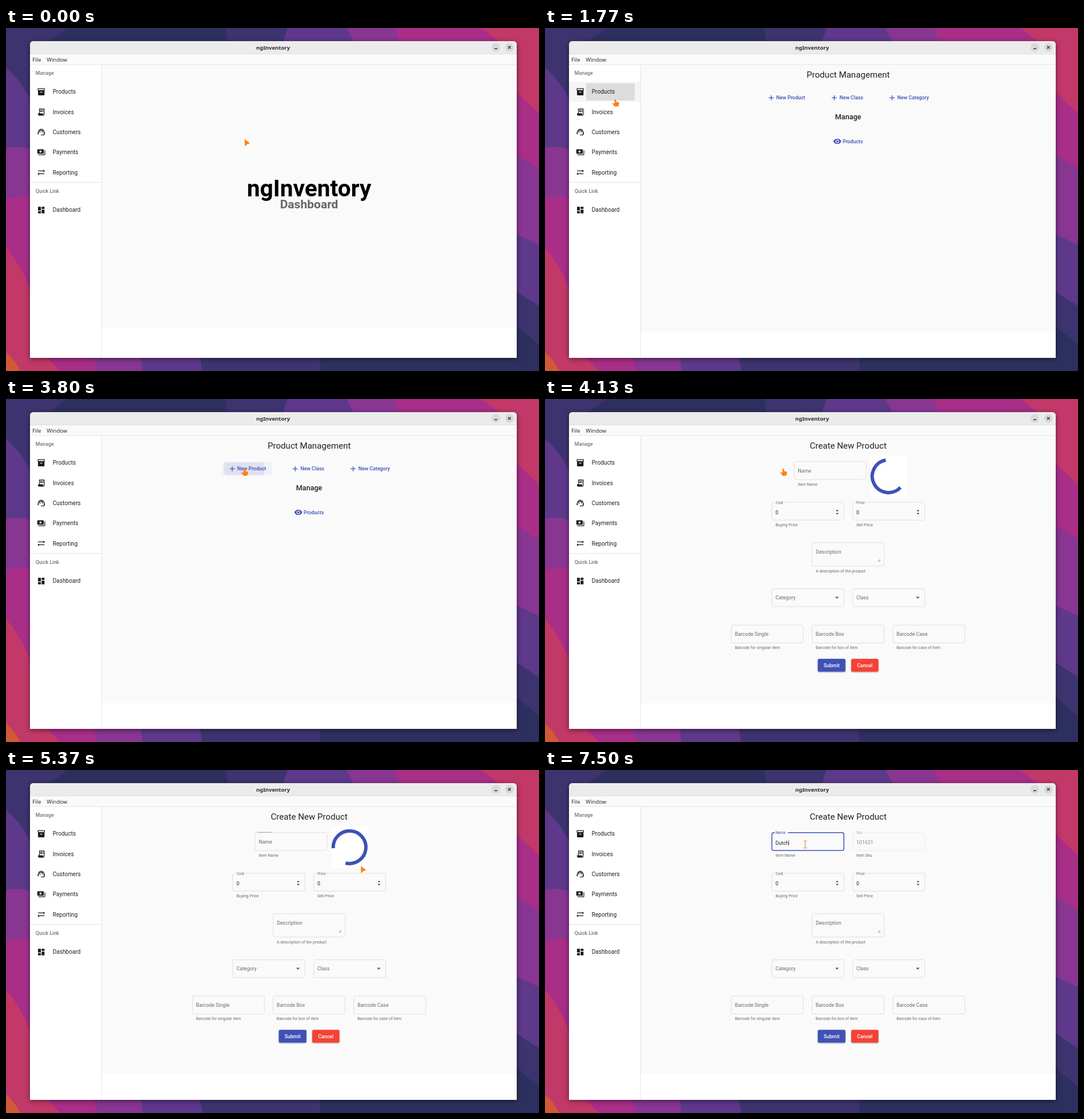
An HTML page for the animation above (8 s loop, 933 by 601 pixels).

```html
<!DOCTYPE html>
<html lang="en">
<head>
<meta charset="utf-8">
<title>Inventory walkthrough</title>
<style>
html, body { margin: 0; width: 100%; height: 100%; overflow: hidden; background: #2d305e; }
svg { display: block; width: 100vw; height: 100vh; }
text { font-family: Roboto, Arial, sans-serif; white-space: pre; }
.gtk { font-family: "Noto Sans", sans-serif; font-size: 9.5px; fill: #2e2e2e; }
.nav { font-size: 10.1px; fill: #212121; }
.head { font-size: 8.8px; font-weight: 500; fill: #757575; }
.title { font-size: 15.1px; fill: #212121; text-anchor: middle; }
.btn { font-size: 8.82px; font-weight: 500; fill: #3f51b5; }
.label { font-size: 8.82px; fill: #696969; }
.small { font-size: 6.6px; fill: #696969; }
.hint { font-size: 7.05px; fill: #696969; }
.value { font-size: 8.82px; fill: #212121; }
.off { opacity: .5; }
.mid { text-anchor: middle; }
.line { fill: none; stroke: #dcdcdc; stroke-width: .9; }
</style>
</head>
<body>
<svg id="stage" viewBox="0 0 933 601" preserveAspectRatio="none" xmlns="http://www.w3.org/2000/svg"></svg>
<script>
const LOOP = 8000;
const BLUE = '#3f51b5', ORANGE = '#ff7f0e';

const ICONS = {
  products: 'M20 2H4c-1 0-2 .9-2 2v3.01c0 .72.43 1.34 1 1.69V20c0 1.1 1.1 2 2 2h14c.9 0 2-.9 2-2V8.7c.57-.35 1-.97 1-1.69V4c0-1.1-1-2-2-2zm-5 12H9v-2h6v2zm5-7H4V4l16-.02V7z',
  invoices: 'M19.5 3.5L18 2l-1.5 1.5L15 2l-1.5 1.5L12 2l-1.5 1.5L9 2 7.5 3.5 6 2v14H3v3c0 1.66 1.34 3 3 3h12c1.66 0 3-1.34 3-3V2l-1.5 1.5zM19 19c0 .55-.45 1-1 1s-1-.45-1-1v-3H8V5h11v14zM9 7h6v2H9zM16 7h2v2h-2zM9 10h6v2H9zM16 10h2v2h-2z',
  customers: 'M21 12.22C21 6.73 16.74 3 12 3c-4.69 0-9 3.65-9 9.28-.6.34-1 .98-1 1.72v2c0 1.1.9 2 2 2h1v-6.1c0-3.87 3.13-7 7-7s7 3.13 7 7V19h-8v2h8c1.1 0 2-.9 2-2v-1.22c.59-.31 1-.92 1-1.64v-2.3c0-.7-.41-1.31-1-1.62zM8 12h2v2H8zM14 12h2v2h-2zM18 11.03C17.52 8.18 15.04 6 12.05 6c-3.03 0-6.29 2.51-6.03 6.45 2.47-1.01 4.33-3.21 4.86-5.89 1.31 2.63 4 4.44 7.12 4.47z',
  payments: 'M19 14V6c0-1.1-.9-2-2-2H3c-1.1 0-2 .9-2 2v8c0 1.1.9 2 2 2h14c1.1 0 2-.9 2-2zm-9-1c-1.66 0-3-1.34-3-3s1.34-3 3-3 3 1.34 3 3-1.34 3-3 3zm13-6v11c0 1.1-.9 2-2 2H4v-2h17V7h2z',
  reporting: 'M22 8l-4-4v3H3v2h15v3l4-4zM2 16l4 4v-3h15v-2H6v-3l-4 4z',
  dashboard: 'M3 13h8V3H3v10zm0 8h8v-6H3v6zm10 0h8V11h-8v10zm0-18v6h8V3h-8z',
  eye: 'M12 4.5C7 4.5 2.73 7.61 1 12c1.73 4.39 6 7.5 11 7.5s9.27-3.11 11-7.5c-1.73-4.39-6-7.5-11-7.5zM12 17c-2.76 0-5-2.24-5-5s2.24-5 5-5 5 2.24 5 5-2.24 5-5 5zm0-8c-1.66 0-3 1.34-3 3s1.34 3 3 3 3-1.34 3-3-1.34-3-3-3z',
  add: 'M19 13h-6v6h-2v-6H5v-2h6V5h2v6h6v2z'
};

// Markup helpers
const text = (x, y, cls, s, extra = '') => `<text x="${x}" y="${y}" class="${cls}" ${extra}>${s}</text>`;
const rect = (x, y, w, h, fill, extra = '') => `<rect x="${x}" y="${y}" width="${w}" height="${h}" fill="${fill}" ${extra}/>`;
const path = (d, extra = '') => `<path d="${d}" ${extra}/>`;
const group = (id, body) => `<g id="${id}">${body}</g>`;
const icon = (name, cx, cy, fill = '#1c1c1c') =>
  `<path d="${ICONS[name]}" fill="${fill}" fill-rule="evenodd" transform="translate(${cx - 7.56} ${cy - 7.56}) scale(.63)"/>`;

// Rounded outline whose top edge is open from x+5 for `gap` pixels
function outline(x, y, w, h, gap = 0, extra = 'class="line"') {
  const r = 3, a = x + 5;
  return path(`M${a + gap} ${y}H${x + w - r}q${r} 0 ${r} ${r}v${h - 2 * r}q0 ${r} ${-r} ${r}H${x + r}q${-r} 0 ${-r} ${-r}V${y + r}q0 ${-r} ${r} ${-r}H${a}`, extra);
}

function field(x, y, label, { hint = '', value = '', gap = 0, h = 31.3, cls = '' } = {}) {
  const labelText = value ? text(x + 6.2, y + 2.6, 'small', label) + text(x + 6.2, y + 20.7, 'value', value)
                          : text(x + 6.2, y + 18.8, 'label', label);
  return `<g class="${cls}">${outline(x, y, 126, h, gap)}${labelText}</g>` + text(x + 6.2, y + h + 10.9, 'hint', hint);
}

const stepper = x => path(`M${x - 2.4} 196.6l2.4 -2.5 2.4 2.5zM${x - 2.4} 199.8l2.4 2.5 2.4 -2.5z`, 'fill="#333"');
const dropdown = x => path(`M${x - 3.4} 346.4h6.8l-3.4 3.5z`, 'fill="#666"');
const raised = (x, w, fill, label) =>
  rect(x, 455.2, w, 22.6, fill, 'rx="2.5" filter="url(#lift)"') + text(x + w / 2, 469.6, 'btn mid', label, 'style="fill:#fff"');

function wallpaper() {
  const corner = ([c, x0, x1, y0, y1]) => path(`M${x0} 0L${x1} 23L894 ${y0}L933 ${y1}V0Z`, `fill="${c}"`);
  const lower = ([c, y0, y1, x0, x1]) => path(`M0 ${y0}Q26 ${(y0 + y1) / 2 - 6} 42 ${y1}L${x0} 578L${x1} 601H0Z`, `fill="${c}"`);
  const dark = '#3d346f', purple = '#5e388b', violet = '#883692', magenta = '#a92e88', crimson = '#c23869';
  return rect(0, 0, 933, 601, '#2d305e') +
    [[dark, 384, 388, 522, 555], [purple, 493, 485, 462, 487], [violet, 596, 608, 362, 380],
     [magenta, 680, 690, 222, 246], [crimson, 832, 862, 113, 150]].map(corner).join('') +
    path('M0 0H107Q92 12 75 23L550 578V601H0Z', `fill="${dark}"`) +
    [[purple, 70, 125, 340, 343], [violet, 210, 213, 236, 239],
     [magenta, 300, 297, 152, 162], [crimson, 385, 457, 72, 95]].map(lower).join('') +
    path('M0 568Q16 582 25 601H0Z', 'fill="#cf5a35"');
}

function frame() {
  return path('M42 578V30q0 -7 7 -7H887q7 0 7 7V578Z', 'fill="#fff" filter="url(#shadow)"') +
    path('M42 46V30q0 -7 7 -7H887q7 0 7 7V46Z', 'fill="#ebebeb"') +
    rect(42, 45.5, 852, 18.5, '#fafafa') + rect(42, 45.2, 852, .7, '#d9d9d9') +
    text(467.5, 37.8, 'gtk mid', 'ngInventory', 'font-weight="700"') +
    text(46.3, 58.7, 'gtk', 'File') + text(71.3, 58.7, 'gtk', 'Window') +
    '<circle cx="857.5" cy="34" r="7.6" fill="#d9d9d9"/><circle cx="881.3" cy="34" r="7.6" fill="#d9d9d9"/>' +
    path('M855 36.3h5M879 31.7l4.6 4.6M883.6 31.7l-4.6 4.6', 'stroke="#2e2e2e" stroke-width="1.4"') +
    rect(167, 64, 727, 469, '#fafafa', 'id="panel"') +
    rect(42, 63.7, 852, .8, '#dedede') + rect(166.7, 64, .8, 514, '#dedede');
}

function sidebar() {
  const items = ['Products', 'Invoices', 'Customers', 'Payments', 'Reporting'];
  return rect(42.3, 94, 124.4, 35.3, '#000', 'id="row"') + rect(72, 97, 85, 30, '#000', 'id="focus"') +
    '<circle id="rowRipple" cx="123" cy="125" clip-path="url(#rowClip)"/>' +
    text(51.8, 82.4, 'head', 'Manage') +
    items.map((s, i) => icon(s.toLowerCase(), 61.7, 111.8 + 35.28 * i) + text(81.7, 115.4 + 35.28 * i, 'nav', s)).join('') +
    rect(42, 270.2, 125, .8, '#dedede') +
    text(51.8, 289.4, 'head', 'Quick Link') +
    icon('dashboard', 61.7, 319) + text(81.7, 322.4, 'nav', 'Dashboard');
}

const home = () =>
  text(530.6, 295.2, 'mid', 'ngInventory', 'font-size="40.7" font-weight="700"') +
  text(530.6, 316.2, 'mid', 'Dashboard', 'font-size="21" font-weight="700" fill="#666"');

const manage = () =>
  rect(378, 110.8, 88, 22.8, BLUE, 'id="hover" rx="2.5"') +
  `<circle id="btnRipple" cx="417" cy="122" fill="${BLUE}" clip-path="url(#btnClip)"/>` +
  text(530.7, 87.2, 'title', 'Product Management') +
  [[396, 404.8, 'New Product'], [506.3, 515.4, 'New Class'], [607.6, 616.7, 'New Category']]
    .map(([cx, x, s]) => icon('add', cx, 122.4, BLUE) + text(x, 125.4, 'btn', s)).join('') +
  text(530.6, 160.1, 'mid', 'Manage', 'font-size="12.6" font-weight="500" fill="#212121"') +
  icon('eye', 511.7, 198.6, BLUE) + text(521, 201.6, 'btn', 'Products');

const form = () =>
  text(530.7, 87.2, 'title', 'Create New Product') +
  group('name',
    outline(0, 109.7, 126, 31.3, 0, 'id="nameLine" class="line"') +
    outline(0, 109.7, 126, 31.3, 0, 'id="nameHover" fill="none" stroke="#333" stroke-width="1"') +
    path('M4 109.2h25', 'id="nameNotch" stroke="#999" stroke-width=".9"') +
    outline(0, 109.7, 126, 31.3, 23, `id="nameFocus" fill="none" stroke="${BLUE}" stroke-width="1.5"`) +
    text(6.2, 128.5, '', 'Name', 'id="nameLabel"') + text(6.2, 130.5, 'value', '', 'id="typed"') +
    rect(0, 122.2, .7, 10, '#333', 'id="caret"') + text(6.2, 151.9, 'hint', 'Item Name')) +
  group('spinner', rect(570, 99, 63, 72, '#fff') + path('', `id="arc" fill="none" stroke="${BLUE}" stroke-width="6"`)) +
  group('sku', field(538.7, 109.7, 'Sku', { hint: 'Item Sku', value: '101631', gap: 14, cls: 'off' })) +
  field(397.2, 180.9, 'Cost', { hint: 'Buying Price', value: '0', gap: 16 }) + stepper(511.5) +
  field(538.7, 180.9, 'Price', { hint: 'Sell Price', value: '0', gap: 17 }) + stepper(653) +
  field(467.7, 251.7, 'Description', { hint: 'A description of the product', h: 41 }) +
  path('M582.5 285l4.5 -4.5M585 285l2 -2', 'stroke="#555" stroke-width=".7"') +
  field(397.2, 332.5, 'Category') + dropdown(511) +
  field(538.7, 332.5, 'Class') + dropdown(652.5) +
  ['Single', 'Box', 'Case'].map((s, i) => field(326.2 + 141.4 * i, 396.2, 'Barcode ' + s,
    { hint: `Barcode for ${['singular', 'box of', 'case of'][i]} item` })).join('') +
  raised(477.5, 48.4, BLUE, 'Submit') + raised(536, 47.7, '#f44336', 'Cancel');

// Pointer shapes, drawn around their hot spot
const pointers = () => group('cursor',
  path('M0 0L9.6 7.8L4.4 9L.6 13.2Z', `id="arrow" fill="${ORANGE}"`) +
  path('M-1.4 .6q1.4 -1.2 2.4 0L1.6 4.3L5.4 5.2q1.6 .4 1.4 2L6 10.6Q5.6 12.4 4 12.4H.2Q-1.2 12.4 -2 11.2L-4.8 7.4q-.2 -1.4 1.2 -1.2L-1 7.4Z', `id="hand" fill="${ORANGE}"`) +
  path('M-3 -6.2H-.8Q0 -6.2 0 -5.2Q0 -6.2 .8 -6.2H3M0 -5.2V5.4M-3 6.2H-.8Q0 6.2 0 5.2Q0 6.2 .8 6.2H3', 'id="beam" fill="none" stroke="#e2a050" stroke-width="1.3"'));

document.getElementById('stage').innerHTML =
  `<defs>
    <filter id="shadow" x="-10%" y="-10%" width="120%" height="120%"><feDropShadow dx="0" dy="2" stdDeviation="5" flood-opacity=".5"/></filter>
    <filter id="lift" x="-20%" y="-20%" width="140%" height="160%"><feDropShadow dx="0" dy="1.1" stdDeviation=".9" flood-opacity=".35"/></filter>
    <clipPath id="rowClip"><rect x="72" y="97" width="85" height="30"/></clipPath>
    <clipPath id="btnClip"><rect x="378" y="110.8" width="88" height="22.8" rx="2.5"/></clipPath>
  </defs>` + wallpaper() + frame() + sidebar() +
  group('home', home()) + group('manage', manage()) + group('form', form()) + pointers();

// Timing
const el = {};
document.querySelectorAll('[id]').forEach(n => el[n.id] = n);
const set = (id, attrs) => { for (const k in attrs) el[id].setAttribute(k, attrs[k]); };
const show = (id, on) => set(id, { display: on ? 'inline' : 'none' });
const ramp = (t, a, b) => Math.min(1, Math.max(0, (t - a) / (b - a)));
const mix = (a, b, p) => a + (b - a) * p;
const smooth = p => p * p * (3 - 2 * p);

function bezier(x1, y1, x2, y2) {
  const at = (a, b, s) => 3 * (1 - s) ** 2 * s * a + 3 * (1 - s) * s * s * b + s ** 3;
  return x => {
    let lo = 0, hi = 1;
    for (let i = 0; i < 24; i++) {
      const m = (lo + hi) / 2;
      if (at(x1, x2, m) < x) lo = m; else hi = m;
    }
    return at(y1, y2, lo);
  };
}
const dashEase = bezier(.35, 0, .25, 1), floatEase = bezier(.25, .8, .25, 1);

const OPEN_MANAGE = 1600, OPEN_FORM = 3890, LOADED = 5430, FOCUS = 6200;
const MOVES = [
  [370, 417.7, 194.5], [830, 190.6, 142], [1000, 190.6, 142], [1100, 123, 125],
  [1850, 123, 125], [2230, 394, 133], [2300, 394, 133], [2630, 417, 122],
  [4430, 417, 122], [5330, 621, 168], [5670, 621, 168], [6200, 455.5, 130.5]
];
const SHAPES = [
  [0, 'arrow'], [1040, 'hand'], [1930, 'arrow'], [2400, 'hand'], [4460, 'arrow'],
  [4560, 'beam'], [4850, 'arrow'], [6040, 'beam']
];
const KEYS = [6900, 7070, 7200, 7400, 7500];
const WORD = 'Dutch';

function pointerAt(t) {
  const i = MOVES.findIndex(m => m[0] > t);
  if (i === 0) return MOVES[0].slice(1);
  if (i < 0) return MOVES[MOVES.length - 1].slice(1);
  const [a, x0, y0] = MOVES[i - 1], [b, x1, y1] = MOVES[i];
  const p = smooth(ramp(t, a, b));
  return [mix(x0, x1, p), mix(y0, y1, p)];
}

// The head grows for half a second, then the tail catches up
function spinnerArc(dt) {
  const cycle = Math.floor(dt / 1000), u = dt % 1000;
  const base = .18 * dt + 270 * cycle;
  const grow = 18 + 270 * dashEase(ramp(u, 0, 500));
  const tail = 270 * dashEase(ramp(u, 500, 1000));
  const r = 28.6;
  const at = deg => {
    const a = deg * Math.PI / 180;
    return `${(601.4 + r * Math.cos(a)).toFixed(2)} ${(135.3 + r * Math.sin(a)).toFixed(2)}`;
  };
  return `M${at(base + tail)}A${r} ${r} 0 ${grow - tail > 180 ? 1 : 0} 1 ${at(base + grow)}`;
}

function drawName(t) {
  const focused = t >= FOCUS, p = focused ? floatEase(ramp(t, FOCUS, FOCUS + 400)) : 0;
  const typed = WORD.slice(0, KEYS.filter(k => k <= t).length);
  set('name', { transform: `translate(${t < LOADED ? 436.2 : 397.2} 0)` });
  show('nameLine', !focused);
  show('nameFocus', focused);
  set('nameHover', { opacity: ramp(t, 4560, 4760) * (1 - ramp(t, 4850, 5250)) });
  set('nameNotch', { opacity: ramp(t, 4560, 4760) * (t < LOADED ? 1 : 0) });
  set('nameLabel', { y: mix(128.5, 112.4, p), 'font-size': mix(8.82, 6.6, p), fill: focused ? BLUE : '#696969' });
  if (el.typed.textContent !== typed) el.typed.textContent = typed;
  show('caret', (t >= FOCUS + 30 && t < 6730) || t >= KEYS[0]);
  set('caret', { x: 6.3 + (typed ? el.typed.getComputedTextLength() : 0) });
}

function draw(t) {
  show('home', t < OPEN_MANAGE);
  show('manage', t >= OPEN_MANAGE && t < OPEN_FORM);
  show('form', t >= OPEN_FORM);
  set('panel', { height: t < OPEN_MANAGE ? 462 : 469 });

  set('row', { opacity: t >= 1040 && t < 1930 ? .04 : 0 });
  set('focus', { opacity: t < 3700 ? .05 * ramp(t, 1000, 1100) : 0 });
  set('rowRipple', { r: 100 * smooth(ramp(t, 1470, 1720)), opacity: .05 * (1 - ramp(t, 1830, 2230)) });
  set('hover', { opacity: .045 * ramp(t, 2400, 2600) });
  set('btnRipple', { r: 70 * smooth(ramp(t, 3700, 3900)), opacity: .1 });

  if (t >= OPEN_FORM) {
    const loading = t < LOADED;
    show('spinner', loading);
    show('sku', !loading);
    if (loading) set('arc', { d: spinnerArc(t - OPEN_FORM) });
    drawName(t);
  }

  const shape = SHAPES.filter(s => s[0] <= t).pop()[1];
  for (const s of ['arrow', 'hand', 'beam']) show(s, s === shape);
  set('cursor', { transform: `translate(${pointerAt(t).map(v => v.toFixed(2)).join(' ')})` });
}

const start = performance.now();
function tick() {
  draw((performance.now() - start) % LOOP);
  requestAnimationFrame(tick);
}
tick();
</script>
</body>
</html>
```
